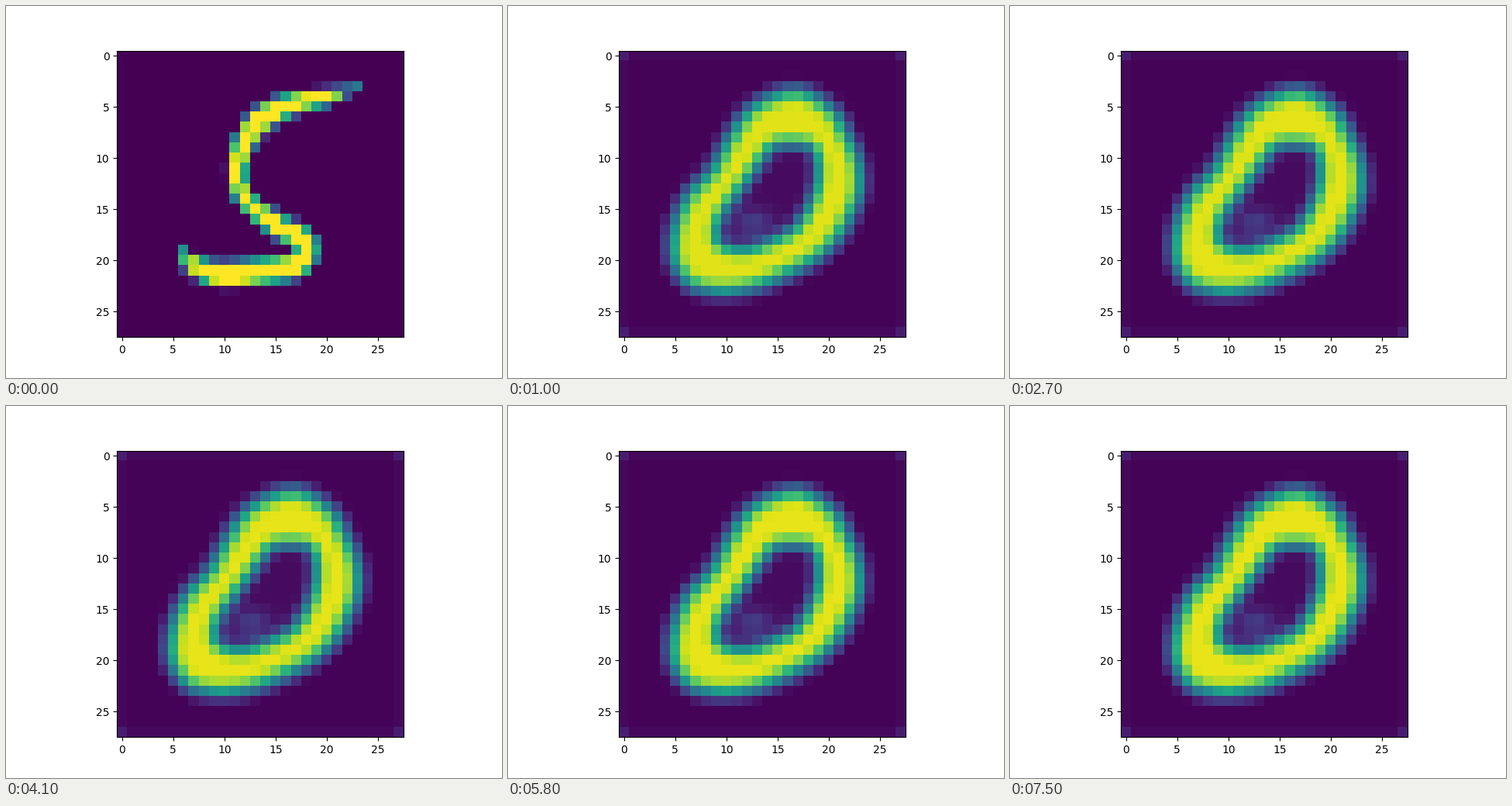
Animation, 640 px wide and 480 px high, one loop 8 s. Source, as a matplotlib script:

```python
import numpy as np
import matplotlib.pyplot as plt
from matplotlib.animation import FuncAnimation
from matplotlib.path import Path

N = 28
STEP = 100
TOTAL = 8000
UPDATES = [100, 1000, 1800, 2700, 3400, 4100, 5000, 5800, 6700, 7500]

Y, X = np.mgrid[0:N, 0:N].astype(float)

# pen path of the five: x, y, half width
FIVE = [(23, 3, -.1), (20.3, 4, .65), (17, 4.65, .95), (14, 6, 1.15),
        (12.1, 8.2, 1), (11.25, 11.5, .8), (12.2, 14.2, .85), (15, 16.5, 1),
        (17.8, 18.2, 1.1), (17.2, 20.4, 1.1), (13, 21.15, 1.15),
        (9.5, 21.4, 1.1), (7.2, 20.6, .85), (6, 19.4, .4)]

# edges of the zero: x, y
OUTER = [(16.7, 3.45), (12.7, 5), (10.4, 7.9), (8.7, 11), (6.3, 13.7),
         (4.9, 17), (4.9, 20.3), (7, 22.7), (11.3, 23), (15.8, 21.5),
         (20.1, 18.8), (22.7, 14.4), (23, 11), (21.8, 7.8), (20.1, 5.1)]
INNER = [(16.4, 8.65), (18.4, 9.1), (19, 11.5), (18.4, 14.2), (16.8, 16.8),
         (14.4, 18.2), (11.5, 19), (9.3, 18.2), (9.3, 16.2), (11, 13.6),
         (13, 10.9), (14.6, 9)]


def spline(points, closed=False, steps=16):
    """Catmull-Rom curve through the key points."""
    p = np.array(points, float)
    ends = (p[-1:], p[:2]) if closed else (p[:1], p[-1:])
    p = np.vstack([ends[0], p, ends[1]])
    a, b, c, d = (p[k:len(p) - 3 + k, None] for k in range(4))
    t = np.linspace(0, 1, steps, endpoint=False)[None, :, None]
    curve = b + .5 * t * (c - a + t * (2 * a - 5 * b + 4 * c - d
                                       + t * (3 * (b - c) + d - a)))
    return np.vstack([curve.reshape(-1, p.shape[1]), p[-2]])


def distance(curve):
    return np.hypot(X[..., None] - curve[:, 0], Y[..., None] - curve[:, 1])


def signed_distance(points):
    """Distance of each cell to a closed edge, positive inside."""
    curve = spline(points, closed=True)
    cells = np.column_stack([X.ravel(), Y.ravel()])
    inside = Path(curve).contains_points(cells).reshape(N, N)
    return np.where(inside, 1, -1) * distance(curve).min(axis=2)


def soft(d, width):
    t = np.clip(d / width + .5, 0, 1)
    return t * t * (3 - 2 * t)


def five():
    curve = spline(FIVE)
    return np.clip(curve[:, 2] - distance(curve) + .5, 0, 1).max(axis=2)


def backdrop():
    img = np.full((N, N), .008)
    img[[0, -1]] = img[:, [0, -1]] = .02
    img[np.ix_([0, -1], [0, -1])] = .08
    return img


D_OUT = signed_distance(OUTER)
D_IN = signed_distance(INNER)
BACKDROP = backdrop()
HAZE = .03 + .16 * np.exp(-((X - 12.6) / 1.9) ** 2 - ((Y - 16.4) / 1.3) ** 2)


def zero(p):
    """The learned zero; p runs from 0 to 1 as it settles."""
    low = np.clip((Y - 16) / 6, 0, 1)
    diag = np.clip((X + Y - 28) / 6, -1, 1)
    body = soft(D_OUT + .2 * (p - .5) * low, 3.5)
    hole = soft(D_IN + .2 * (p - .5) * diag, 3.1)
    ring = (.955 + .012 * p) * body * (1 - hole)
    return np.maximum(ring + HAZE * hole, BACKDROP)


last = len(UPDATES) - 1
images = [five()] + [zero(k / last) for k in range(last + 1)]

fig, ax = plt.subplots(figsize=(6.4, 4.8), dpi=100)
picture = ax.imshow(images[0], cmap="viridis", vmin=0, vmax=1)


def draw(i):
    picture.set_data(images[np.searchsorted(UPDATES, i * STEP, side="right")])
    return [picture]


anim = FuncAnimation(fig, draw, frames=TOTAL // STEP, interval=STEP,
                     repeat=True, repeat_delay=0)
plt.show()
```
